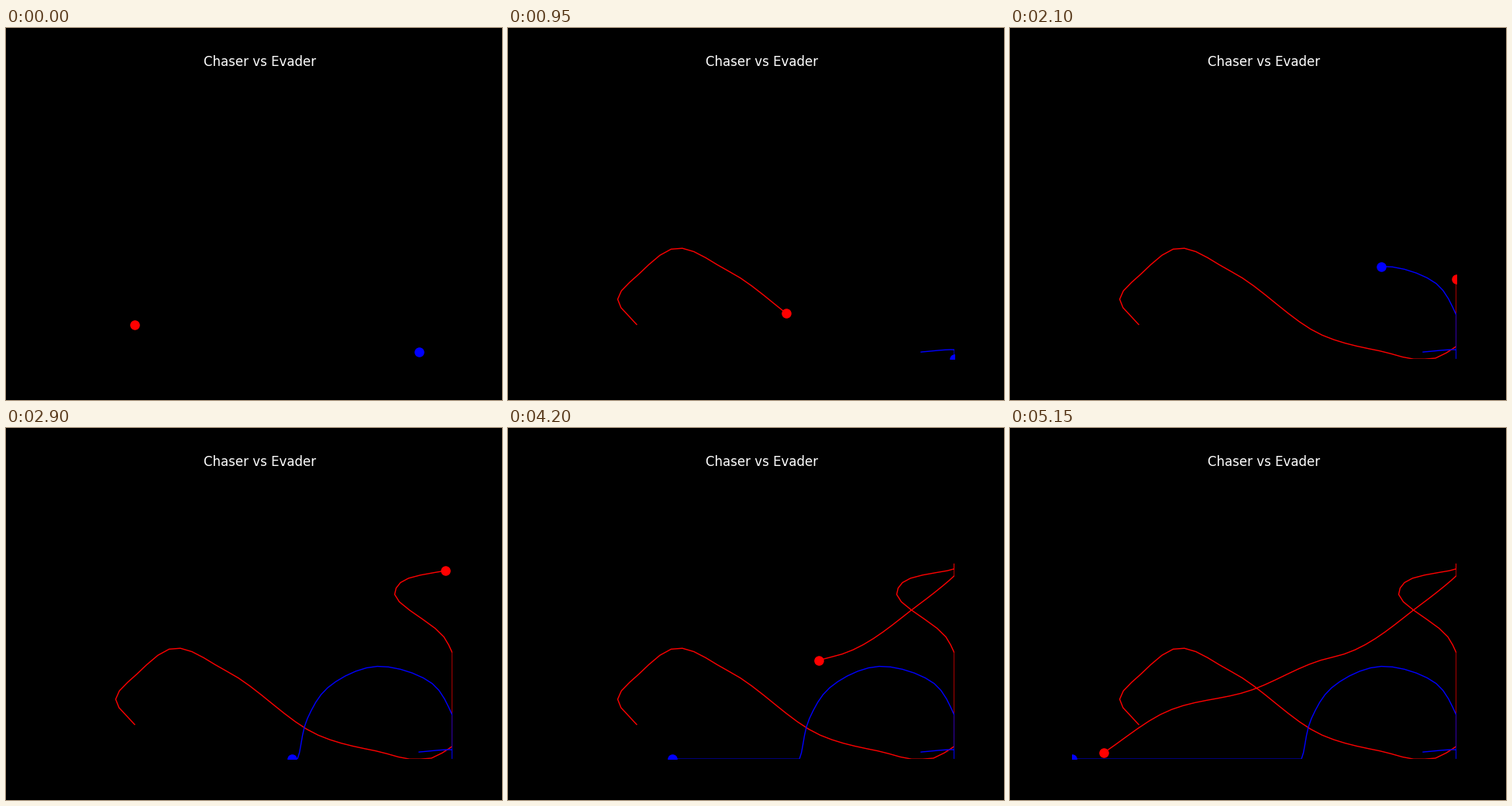
A matplotlib script for the animation above (5200 ms loop, 640 px wide and 480 px high).

```python
import numpy as np
import matplotlib.pyplot as plt
from matplotlib.animation import FuncAnimation

FRAMES = 104
STEP_MS = 50
LOW, HIGH = (80, 52.8), (576, 427.2)  # walls of the arena in pixels

# Turning points: (step, x, y)
CHASER = [
    (0, 166, 382), (3, 141.5, 349), (6, 169, 316), (9, 210.5, 283.5),
    (14, 285, 312.5), (22, 403, 396), (27, 477, 416.5), (32, 549, 426),
    (34, 576, 410.5), (45, 576, 288.5), (47, 565, 267.5), (52, 501.5, 212),
    (54, 509, 196.5), (59, 576, 178.5), (62, 576, 172.5), (69, 576, 187.5),
    (74, 529, 226), (82, 431, 290), (84, 401, 298), (90, 313, 336.5),
    (98, 194, 369), (103, 121, 419),
]
EVADER = [
    (0, 533, 418), (4, 538, 417.5), (10, 576, 415), (18, 576, 428),
    (25, 576, 428), (33, 576, 370), (37, 550, 328.5), (42, 479, 306),
    (47, 415, 334), (51, 389, 374), (56, 376, 428), (70, 310, 428),
    (84, 212, 428), (103, 52, 428),
]


def path(keys):
    """Smooth cubic run through the turning points, stopped by the walls."""
    keys = np.array(keys, float)
    t, p = keys[:, 0], keys[:, 1:]
    v = np.gradient(p, t, axis=0)
    steps = np.arange(FRAMES)
    k = np.clip(np.searchsorted(t, steps, side="right") - 1, 0, len(t) - 2)
    h = (t[k + 1] - t[k])[:, None]
    u = (steps - t[k])[:, None] / h
    ease = u * u * (3 - 2 * u)
    points = (p[k] + (p[k + 1] - p[k]) * ease
              + h * u * (1 - u) * (v[k] * (1 - u) - v[k + 1] * u))
    return np.clip(points, LOW, HIGH)


fig, ax = plt.subplots(figsize=(6.4, 4.8), dpi=100, facecolor="black")
ax.set_facecolor("black")
ax.set_xlim(LOW[0], HIGH[0])
ax.set_ylim(HIGH[1], LOW[1])
ax.set_xticks([])
ax.set_yticks([])
ax.set_title("Chaser vs Evader", color="white")

agents = []
for keys, color in ((CHASER, "red"), (EVADER, "blue")):
    # Dots lie above the black frame, trails below it
    dot, = ax.plot([], [], "o", color=color, markersize=8, zorder=3)
    trail, = ax.plot([], [], color=color, linewidth=1)
    agents.append((path(keys), dot, trail))


def update(i):
    for points, dot, trail in agents:
        dot.set_data(points[i:i + 1].T)
        trail.set_data(points[:i + 1].T)
    return [artist for _, *pair in agents for artist in pair]


anim = FuncAnimation(fig, update, frames=FRAMES, interval=STEP_MS,
                     repeat=True, repeat_delay=0)
plt.show()
```
